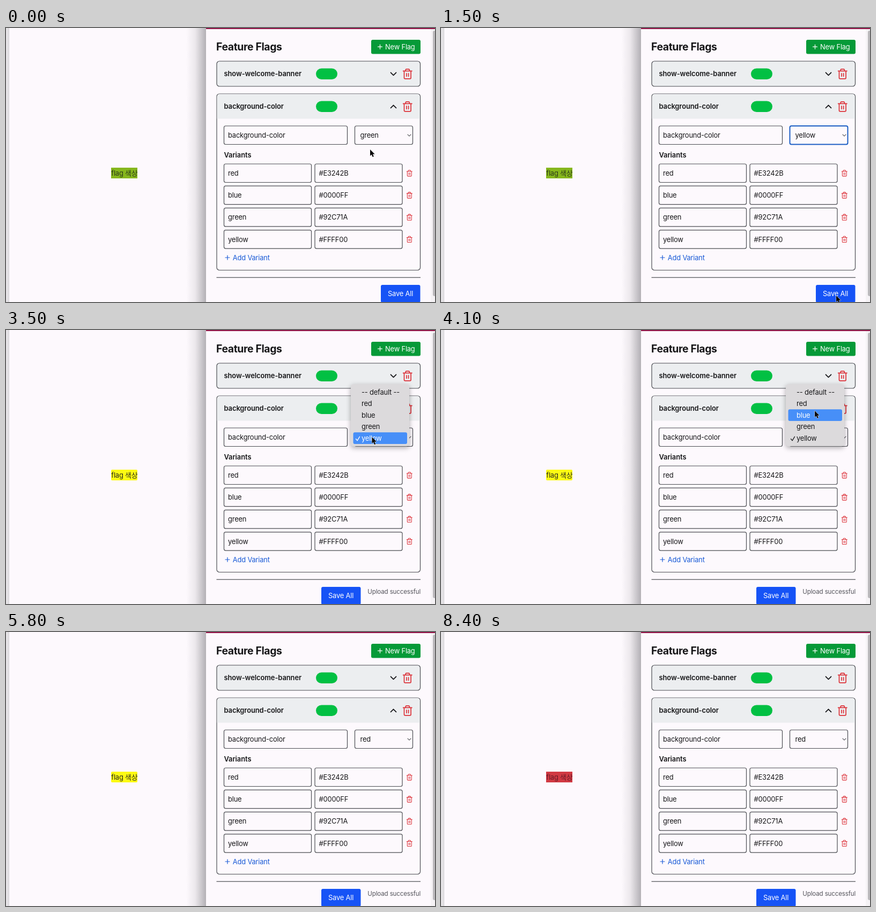
Write an HTML page that moves like this. It is 800x512 px and loops after 8500 ms.

```html
<!DOCTYPE html>
<html lang="en">
<head>
<meta charset="utf-8">
<title>Feature Flags</title>
<style>
  html, body { margin: 0; width: 100%; height: 100%; overflow: hidden; background: #fdf9fd; }
  svg { display: block; width: 800px; height: 512px; }
  text { font: 400 12.9px Inter, "Noto Sans CJK KR", "Noto Sans CJK", sans-serif; letter-spacing: -.014em; fill: #161618; }
  .bold { font-weight: 600; letter-spacing: -.005em; }
  .title { font-size: 19.4px; font-weight: 700; letter-spacing: -.02em; }
  .light { fill: #fff; }
  .link { fill: #1759d6; }
  .note { font-size: 11.6px; fill: #55555c; }
  .box { fill: #fdf9fd; stroke: #4b4d52; stroke-width: 1.2; }
  .icon { fill: none; stroke-linecap: round; stroke-linejoin: round; }
  #menu { filter: drop-shadow(0 3px 5px rgba(0, 0, 0, .32)); }
</style>
</head>
<body>
<svg id="stage" viewBox="0 0 800 512" xmlns="http://www.w3.org/2000/svg">
  <defs>
    <linearGradient id="shade">
      <stop offset="0" stop-color="#77757a" stop-opacity="0"/>
      <stop offset=".45" stop-color="#77757a" stop-opacity=".13"/>
      <stop offset="1" stop-color="#77757a" stop-opacity=".55"/>
    </linearGradient>
  </defs>
</svg>
<script>
const NS = 'http://www.w3.org/2000/svg';
const LOOP = 8500, STEP = 100;
const stage = document.getElementById('stage');

function add(tag, attrs, parent = stage) {
  const el = document.createElementNS(NS, tag);
  for (const k in attrs) el.setAttribute(k, attrs[k]);
  return parent.appendChild(el);
}
function rect(x, y, width, height, attrs, parent) {
  return add('rect', { x, y, width, height, ...attrs }, parent);
}
function label(x, y, str, cls = '', parent) {
  const el = add('text', { x, y, class: cls }, parent);
  el.textContent = str;
  return el;
}
function icon(d, stroke, width, attrs, parent) {
  return add('path', { d, stroke, 'stroke-width': width, class: 'icon', ...attrs }, parent);
}
function field(x, y, w, str) {
  const box = rect(x, y, w, 34.5, { rx: 3, class: 'box' });
  return { box, text: label(x + 7.5, y + 22, str) };
}
function trash(x, y, scale, width) {
  icon('M3 6h18M19 6v14a2 2 0 0 1-2 2H7a2 2 0 0 1-2-2V6M8 6V4a2 2 0 0 1 2-2h4a2 2 0 0 1 2 2v2M10 11v6M14 11v6',
    '#dc3138', width, { transform: `translate(${x} ${y}) scale(${scale}) translate(-12 -12)` });
}
function header(y, name, chevron) {
  label(406.5, y + 4.6, name, 'bold');
  rect(578, y - 10.3, 40, 20.6, { rx: 10.3, fill: '#02c043' });
  icon(`M717.5 ${y - 2.5 * chevron}l5 ${5 * chevron}l5 ${-5 * chevron}`, '#18181b', 1.8);
  trash(748.8, y, .9, 1.9);
}

// Page behind the panel
rect(0, 0, 5, 512, { fill: '#e4e2e5' });
rect(5, 0, 1, 512, { fill: '#d2d0d3' });
const mark = rect(196, 261, 49, 20, {});
const markText = label(196.3, 276, 'flag 색상');
rect(336, 0, 37, 512, { fill: 'url(#shade)' });

// Panel
rect(373, 0, 427, 512, { fill: '#fdf9fd' });
rect(373, 0, 427, 2, { fill: '#921246' });
rect(792, 2, 8, 510, { fill: '#f5f2f5' });
rect(796, 5, 6, 496, { rx: 3, fill: '#bbb9bc' });
label(392, 42, 'Feature Flags', 'title');
rect(681, 22, 92, 26.5, { rx: 3, fill: '#069a38' });
icon('M693.5 35.2h8M697.5 31.2v8', '#fff', 1.2);
label(707, 39.8, 'New Flag', 'light');

rect(393, 62, 379.5, 47, { rx: 5, class: 'box', style: 'fill:#eceef0' });
header(85.8, 'show-welcome-banner', 1);
rect(393, 123, 379.5, 329.5, { rx: 5, class: 'box' });
add('path', { d: 'M393.6 169.5V128a4.4 4.4 0 0 1 4.4-4.4h369.5a4.4 4.4 0 0 1 4.4 4.4v41.5z', fill: '#eceef0' });
header(146.8, 'background-color', -1);

field(406.5, 183, 230, 'background-color');
const select = field(650.5, 183, 108, 'green');
select.text.setAttribute('x', 660.5);
icon('M749 199l3 3l3-3', '#66666b', 1.1);
label(406.5, 242.2, 'Variants', 'bold');

[['red', '#E3242B'], ['blue', '#0000FF'], ['green', '#92C71A'], ['yellow', '#FFFF00']].forEach(([name, hex], i) => {
  const y = 254 + i * 41.2;
  field(406.5, y, 163, name);
  field(576, y, 163, hex);
  trash(752.3, y + 17.3, .56, 1.9);
});
icon('M409 429h8M413 425v8', '#1759d6', 1.2);
label(422.8, 433.6, 'Add Variant', 'link');
rect(392.5, 465.6, 380.5, 1.2, { fill: '#4b4d52' });

const save = add('g', {});
rect(699, 480, 73.5, 33, { rx: 3, fill: '#1653f6' }, save);
label(712, 501.4, 'Save All', 'light', save);
const note = label(674.3, 492.6, 'Upload successful', 'note');

// Select menu
const OPTIONS = ['-- default --', 'red', 'blue', 'green', 'yellow'];
const ROW = 21.5;
const menu = add('g', { id: 'menu' });
rect(643, 0, 109, 116, { rx: 5, fill: '#dcdadc' }, menu);
const hover = rect(647.5, 0, 100.5, 21.8, { rx: 3, fill: '#478ff8' }, menu);
const items = OPTIONS.map((str, i) => label(663, 19.6 + i * ROW, str, '', menu));
const tick = icon('M652.5 1l2.6 3.2l4.4-7.4', '#1d1d20', 1.3, {}, menu);

const cursor = add('path', {
  d: 'M0 0v12l2.7-2.5l2 4.6l2.2-1l-2-4.4h3.8z',
  fill: '#0b0b0c', stroke: '#fff', 'stroke-width': 1, 'stroke-linejoin': 'round', 'paint-order': 'stroke'
});

// Timeline: [time, x, y]
const PATH = [
  [0, 679, 227], [300, 679, 227], [700, 694, 218], [900, 694, 219], [1400, 737, 499], [1500, 737, 500],
  [2100, 737, 500], [2700, 672, 226], [3200, 672, 226], [3700, 688, 186], [4100, 697, 151], [4500, 694, 137],
  [4700, 694, 137], [5100, 626, 497], [5300, 626, 499], [5500, 626, 530]
];
const MENUS = [{ from: 300, to: 1000, pick: 3 }, { from: 3200, to: 4700, pick: 4 }];
const SAVED = [2000, 6100];

function pointer(t) {
  const i = PATH.findIndex(p => p[0] > t);
  if (i < 0) return PATH[PATH.length - 1].slice(1);
  const [a, b] = [PATH[i - 1], PATH[i]];
  const u = (t - a[0]) / (b[0] - a[0]), k = u * u * (3 - 2 * u);
  return [a[1] + (b[1] - a[1]) * k, a[2] + (b[2] - a[2]) * k];
}
function show(el, on) {
  el.setAttribute('visibility', on ? 'visible' : 'hidden');
}

function draw(t) {
  const [x, y] = pointer(t);
  cursor.setAttribute('transform', `translate(${x} ${y})`);
  show(cursor, y < 512);

  const [fill, ink, rx] = t < SAVED[0] ? ['#86b71d', '#2c3a1c', 0]
    : t < SAVED[1] ? ['#fdfb13', '#29291c', 2] : ['#d13a43', '#691b28', 0];
  mark.setAttribute('fill', fill);
  mark.setAttribute('rx', rx);
  markText.style.fill = ink;

  select.text.textContent = t < MENUS[0].to ? 'green' : t < MENUS[1].to ? 'yellow' : 'red';
  const focus = (t >= MENUS[0].to && t < 1700) || (t >= MENUS[1].to && t < 5300);
  select.box.style.stroke = focus ? '#1d5fc4' : '';
  select.box.style.strokeWidth = focus ? 2 : '';

  const done = t >= SAVED[0];
  save.setAttribute('transform', `translate(${done ? -111 : 0} 0)`);
  show(note, done);

  const open = MENUS.find(m => t >= m.from && t < m.to);
  menu.style.display = open ? '' : 'none';
  if (!open) return;
  const top = 187.2 - open.pick * ROW;
  const row = Math.max(0, Math.min(4, Math.floor((y - top - 4) / ROW)));
  menu.setAttribute('transform', `translate(0 ${top})`);
  hover.setAttribute('y', 4 + row * ROW);
  items.forEach((el, i) => el.setAttribute('class', i === row ? 'light' : ''));
  tick.setAttribute('transform', `translate(0 ${15.3 + open.pick * ROW})`);
  tick.setAttribute('stroke', row === open.pick ? '#fff' : '#1d1d20');
}

const start = performance.now();
function tick60() {
  const t = (performance.now() - start) % LOOP;
  draw(Math.floor(t / STEP) * STEP);
  requestAnimationFrame(tick60);
}
tick60();
</script>
</body>
</html>
```
